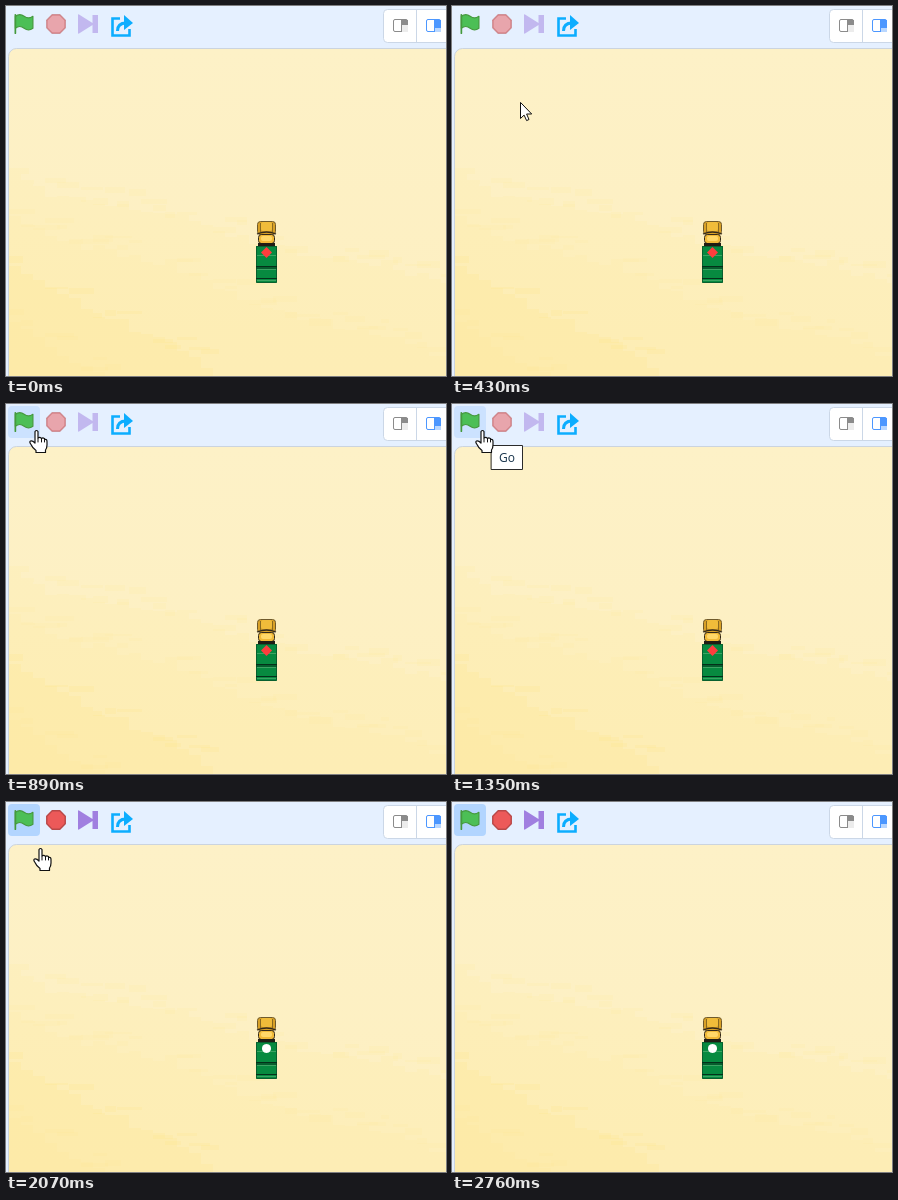
Write an HTML page with a canvas that moves like this. It is 440x370 px and loops after 3610 ms.

```html
<!DOCTYPE html>
<html lang="en">
<head>
<meta charset="utf-8">
<title>Stage controls</title>
<style>
html, body { margin: 0; width: 100%; height: 100%; overflow: hidden; background: #e5f0ff; }
canvas { display: block; }
</style>
</head>
<body>
<canvas id="view" width="440" height="370"></canvas>
<script>
const W = 440, H = 370, LOOP = 3610;
const ctx = document.getElementById('view').getContext('2d');

const SHOW_TIP = 1350, CLICK = 1510, RUN = 1590, MARK = 1670;
const HAND_ON = 815, HAND_OFF = 2130;
const SLACK = 12;

const linear = u => u;
const easeIn = n => u => u ** n;
const easeOut = n => u => 1 - (1 - u) ** n;

// Pointer sweeps, each sampled in equal steps and held at its end until `until`
const SWEEPS = [
  { start: 70, end: 590, until: 590, steps: 7, from: [247, 343], to: [49, 48], ease: [easeOut(1.87), easeOut(1.456)] },
  { start: 590, end: 890, until: 2070, steps: 4, from: [49, 48], to: [29, 26], ease: [linear, linear] },
  { start: 2070, end: 2680, until: 2760, steps: 8, from: [33, 46], to: [285, 358], ease: [easeIn(1.366), easeOut(1.19)] }
];

function pointerAt(t) {
  const s = SWEEPS.find(s => t >= s.start && t < s.until);
  if (!s) return null;
  const gap = (s.end - s.start) / s.steps;
  const u = Math.min(s.steps, Math.floor((t - s.start + SLACK) / gap)) / s.steps;
  return s.from.map((a, i) => Math.round(a + (s.to[i] - a) * s.ease[i](u)));
}

function rect(c, x, y, w, h, fill, stroke, radius = 0) {
  c.beginPath();
  c.roundRect(x, y, w, h, radius);
  if (fill) { c.fillStyle = fill; c.fill(); }
  if (stroke) { c.strokeStyle = stroke; c.lineWidth = 1; c.stroke(); }
}

// Fills and strokes SVG path data moved to x, y
function path(c, data, x, y, fill, stroke, width = 1, scale = 1) {
  const p = new Path2D(data);
  c.save();
  c.translate(x, y);
  c.scale(scale, scale);
  if (fill) { c.fillStyle = fill; c.fill(p); }
  if (stroke) { c.strokeStyle = stroke; c.lineWidth = width; c.stroke(p); }
  c.restore();
}

function polygon(c, x, y, sides, radius, turn, fill, stroke, width) {
  c.beginPath();
  for (let i = 0; i < sides; i++) {
    const a = (i + turn) / sides * Math.PI * 2;
    c.lineTo(x + radius * Math.cos(a), y + radius * Math.sin(a));
  }
  c.closePath();
  c.fillStyle = fill;
  c.fill();
  if (stroke) { c.strokeStyle = stroke; c.lineWidth = width; c.stroke(); }
}

function seeded(seed) {
  return () => (seed = (seed * 16807) % 2147483647) / 2147483647;
}

// A sand layer with a blocky sloping edge and loose streaks around it
function sand(c, top, slope, alpha, random) {
  c.fillStyle = `rgba(250,222,125,${alpha})`;
  for (let x = 3; x < W; x += 12) {
    const edge = top + slope * x + 5 * Math.sin(x / 35);
    const y = Math.round(edge + (random() - .5) * 10);
    c.fillRect(x, y, 12, H);
    if (random() < .7) {
      c.fillRect(x, Math.round(edge - random() * 18), 8 + Math.round(random() * 22), 2 + Math.round(random() * 5));
    }
  }
}

function drawViewIcon(c, x, color, blockHeight, pane) {
  rect(c, x + .5, 13.5, 14, 12, '#fff', color, 1.5);
  rect(c, x + 9, 14, 6, 12, pane);
  rect(c, x + 9, 14, 6, blockHeight, color);
  rect(c, x + 8, 14, 1, 12, color);
}

function drawShare(c) {
  const blue = '#0cadff';
  path(c, 'M114 12.5H106.5V29.5H123.5V23', 0, 0, null, blue, 2.6);
  path(c, 'M111.5 25Q111.5 17 120 17', 0, 0, null, blue, 3);
  path(c, 'M118 9L127 17L118 24Z', 0, 0, blue);
}

function drawTruck(c) {
  const dark = '#33291a';
  // Cab
  rect(c, 251.5, 215.5, 18, 13, '#d9a127', '#6f5a2c', 3);
  rect(c, 255, 216, 11, 9, '#f0bc3a', null, 2);
  for (const x of [254, 266]) rect(c, x, 217, 1, 9, '#8a6a20');
  path(c, 'M251 228Q260.5 224 270 228', 0, 0, null, dark, 1.3);
  rect(c, 252.5, 228.5, 16, 9, '#f0b938', dark, 3);
  rect(c, 255, 230, 11, 5, '#ffd768', null, 2);
  rect(c, 252, 237, 17, 3, '#201c14');
  // Trailer
  rect(c, 250, 240, 21, 36.5, '#078a40');
  rect(c, 250.5, 240.5, 20, 36, null, '#08602f');
  for (const y of [249, 263, 274]) rect(c, 251, y, 19, 1, '#3da363');
  for (const y of [260, 261.5, 272]) rect(c, 250, y, 21, 1, '#04301a');
}

function makeScene() {
  const scene = document.createElement('canvas');
  scene.width = W;
  scene.height = H;
  const c = scene.getContext('2d');
  rect(c, 0, 0, W, H, '#e5f0ff');
  c.save();
  c.beginPath();
  c.roundRect(2.5, 42.5, 500, 400, 8);
  c.clip();
  const base = c.createLinearGradient(0, 43, 0, H);
  base.addColorStop(0, '#fdf1c7');
  base.addColorStop(1, '#fdefc0');
  rect(c, 0, 42, W, H, base);
  const random = seeded(71);
  sand(c, 172, .25, .1, random);
  sand(c, 212, .33, .08, random);
  sand(c, 255, .56, .17, random);
  sand(c, 312, .6, .1, random);
  c.restore();
  rect(c, 2.5, 42.5, 500, 400, null, '#cbd4df', 8);
  drawShare(c);
  rect(c, 377.5, 3.5, 80, 33, '#fff', '#cbd7e7', 4);
  rect(c, 410, 4, 1, 32, '#cbd7e7');
  drawViewIcon(c, 387, '#8b8b8b', 5, '#ececec');
  drawViewIcon(c, 420, '#4c97ff', 8, '#b9d7ff');
  drawTruck(c);
  return scene;
}

const FLAG = 'M.75 2A6.44 6.44 0 0 1 8.44 2A6.44 6.44 0 0 0 16.13 2V12.4A6.44 6.44 0 0 1 8.44 12.4A6.44 6.44 0 0 0 .75 12.4Z';

function drawControls(hover, running) {
  if (running || hover) rect(ctx, 2, 2, 32, 32, running ? '#b2d5ff' : '#cce2ff', null, 4);
  ctx.lineCap = ctx.lineJoin = 'round';
  path(ctx, FLAG, 8.5, 8, '#4cbf56', '#45993d', 1, 20 / 17.5);
  path(ctx, 'M.75 16.75V.75', 8.5, 8, null, '#45993d', 1.5, 20 / 17.5);
  ctx.globalAlpha = running ? 1 : .5;
  polygon(ctx, 50, 18, 8, 10, .5, '#ec5959', '#b84848', 1.4);
  path(ctx, 'M0 1Q0 0 1 .5L14.5 9V1H20V19H14.5V11L1 19.5Q0 20 0 19Z', 72, 8, '#a07fe0');
  ctx.globalAlpha = 1;
}

function drawMarker(running) {
  if (running) polygon(ctx, 260.5, 246.5, 24, 4.5, 0, '#fff');
  else polygon(ctx, 260.5, 246.5, 4, 5.5, 0, '#ff3d3d');
}

function drawTip(alpha) {
  ctx.globalAlpha = alpha;
  rect(ctx, 39.5, 41.5, 31, 24, '#fff', '#2b2b2b');
  ctx.fillStyle = '#16324a';
  ctx.font = '12px "Open Sans", "Noto Sans", sans-serif';
  ctx.fillText('Go', 47, 58);
  ctx.globalAlpha = 1;
}

const ARROW = 'M.5 .8V16.5L4.1 13.1L6.6 18.6L9 17.5L6.6 12H11.3Z';
const HAND = 'M-1.5 1.5Q0 -.5 1.5 1.5V8Q3.5 6.5 5 8.5Q7 7 8.5 9.5Q10.5 9 10.5 11.5V15Q10.5 18 9 20V22.5H-.5V20.5Q-4 18 -5.5 14.5Q-7.5 12 -6 11Q-4 10.3 -1.5 13Z';

function drawPointer(x, y, hand) {
  if (hand) {
    path(ctx, HAND, x + 1.5, y, '#fff', '#111', 1.2);
    for (const k of [1.5, 5, 8]) path(ctx, 'M0 8.5V12', x + 1.5 + k, y, null, '#111');
  } else {
    path(ctx, ARROW, x, y, '#fff', '#111');
  }
}

const scene = makeScene();

function frame(t) {
  const hover = t >= HAND_ON && t < HAND_OFF;
  ctx.drawImage(scene, 0, 0);
  drawControls(hover, t >= RUN);
  drawMarker(t >= MARK);
  if (t >= SHOW_TIP && t < CLICK) drawTip(t < SHOW_TIP + 80 ? 1 : .6);
  const spot = pointerAt(t);
  if (spot) drawPointer(...spot, hover);
}

const start = performance.now();
function tick() {
  frame((performance.now() - start) % LOOP);
  requestAnimationFrame(tick);
}
tick();
</script>
</body>
</html>
```
